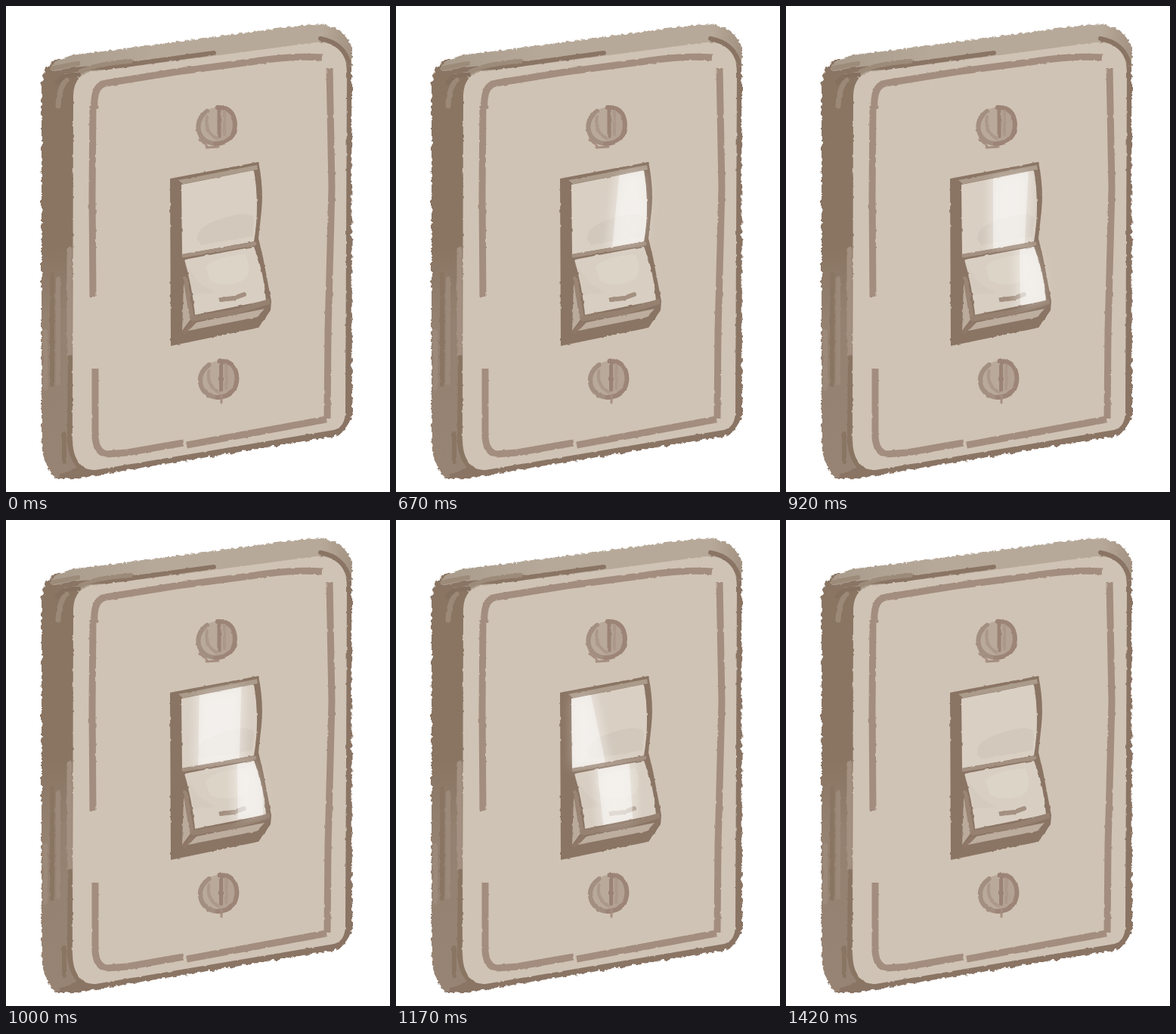
An HTML page for the animation above (2.58 s loop, 508 px wide and 642 px high).

```html
<!DOCTYPE html>
<html lang="en">
<head>
<meta charset="utf-8">
<title>Light switch</title>
<style>
html, body { margin: 0; width: 100%; height: 100%; overflow: hidden; background: #fff; }
svg { display: block; width: 100vw; height: 100vh; }
.line { fill: none; stroke-linecap: round; stroke-linejoin: round; }
</style>
</head>
<body>
<svg viewBox="0 0 508 642">
  <defs>
    <filter id="rough" filterUnits="userSpaceOnUse" x="0" y="0" width="508" height="642" color-interpolation-filters="sRGB">
      <feTurbulence type="fractalNoise" baseFrequency=".18" numOctaves="3" seed="4"/>
      <feDisplacementMap in="SourceGraphic" scale="6" xChannelSelector="R" yChannelSelector="G"/>
    </filter>
    <filter id="grain" filterUnits="userSpaceOnUse" x="0" y="0" width="508" height="642" color-interpolation-filters="sRGB">
      <feTurbulence type="fractalNoise" baseFrequency=".13" numOctaves="2" seed="9"/>
      <feDisplacementMap in="SourceGraphic" scale="2.5" xChannelSelector="R" yChannelSelector="G"/>
    </filter>
    <filter id="soft" filterUnits="userSpaceOnUse" x="180" y="180" width="210" height="260"><feGaussianBlur stdDeviation="6"/></filter>
    <filter id="halo" filterUnits="userSpaceOnUse" x="180" y="180" width="210" height="260"><feGaussianBlur stdDeviation="8"/></filter>
    <linearGradient id="side" x1="0" y1="0" x2="0" y2="1">
      <stop offset=".45" stop-color="#8a7563"/><stop offset=".62" stop-color="#958170"/><stop offset="1" stop-color="#988474"/>
    </linearGradient>
    <linearGradient id="topSide"><stop offset="0" stop-color="#a99b8b"/><stop offset=".35" stop-color="#b7a999"/><stop offset=".9" stop-color="#b7a999"/><stop offset="1" stop-color="#a39282"/></linearGradient>
    <path id="upper" d="M232 236L328 217Q336 264 328 311L233 328Z"/>
    <path id="lower" d="M236 335L328 318Q341 350 344 389L250 408Q246 368 236 335Z"/>
    <clipPath id="clip0"><use href="#upper"/></clipPath>
    <clipPath id="clip1"><use href="#lower"/></clipPath>
  </defs>

  <g filter="url(#rough)">
    <path fill="url(#side)" d="M47 108Q48 72 76 68L120 66V614L100 621Q85 627 66 623Q49 612 47 575Z"/>
    <path fill="#8a7464" d="M92 610L444 550L456 535Q457 559 436 568L95 624L64 624Z M440 60L457 66L458 540L446 552Z"/>
    <path fill="url(#topSide)" d="M58 84Q62 70 88 65L404 24Q452 25 457 56V82L430 60L100 95Z"/>
  </g>

  <g filter="url(#grain)">
    <path fill="#cfc3b5" d="M89 118Q90 88 118 86L275 66L410 48Q450 46 451 88L449 535Q449 556 434 560L118 613Q88 614 88 570Z"/>
    <g class="line">
      <path stroke="#8a7464" stroke-width="6" d="M62 90Q90 82 135 81L275 62 M416 43Q447 49 454 76"/>
      <path stroke="#9d8b7a" stroke-width="6" d="M62 82L95 76 M98 87Q120 76 165 73"/>
      <path stroke="#857060" stroke-width="6" d="M68 101Q76 89 96 91"/>
      <path stroke="#9c8877" stroke-width="7" d="M69 132Q70 108 80 98"/>
      <path stroke="#a39080" stroke-width="7" d="M84 322V460"/>
      <path stroke="#8a7563" stroke-width="6" d="M85 464L84 575Q86 600 100 611 M61 354V500 M77 565V602"/>
      <path stroke="#9c8979" stroke-width="6" d="M69 360V498 M52 430V505"/>
      <path stroke="#a38d7e" stroke-width="9" stroke-linecap="butt" d="M115 384L114 250L115 132 M117 136Q115 105 132 102L225 87L330 73Q380 65 418 68 M428 82L431 240L426 430L425 545 M118 479V570Q120 590 133 592L160 590L235 577 M239 580L375 555L424 546"/>
    </g>

    <g id="screw">
      <circle cx="279" cy="158" r="24" fill="#b9a99b"/>
      <path fill="#b3a194" d="M286 136Q305 145 302 162Q298 178 278 181Z"/>
      <g class="line">
        <path stroke="#a38f81" stroke-width="6" d="M266 139Q250 151 256 168Q262 182 280 182"/>
        <path stroke="#9c8476" stroke-width="6" d="M280 134Q302 133 303 157Q302 181 277 182"/>
        <path stroke="#9a8375" stroke-width="5" d="M282 136L282 172"/>
        <path stroke="#ab988a" stroke-width="4" d="M289 139L289 170 M266 147Q262 164 278 175"/>
      </g>
    </g>
    <use href="#screw" x="2.5" y="335"/>
    <path class="line" stroke="#a68f82" stroke-width="3" d="M256 176L266 185 M265 187L281 186 M285 515V524"/>

    <path fill="#8a7463" d="M217 228L334 206Q341 240 338 270L334 307L340 332L351 390L350 402L334 425L218 449Z"/>
    <path fill="#ab9b8b" d="M228 230L332 210L333 216L234 235Z"/>
    <path fill="#baaa9b" d="M235 365L247 410L233 429Z"/>
    <path fill="#bcad9e" d="M252 418L342 400L332 411L241 429Z"/>
    <use href="#upper" fill="#d9cfc3"/>
    <path fill="#d2c8bc" d="M253 309Q250 291 288 280Q320 270 328 280L326 311L265 322Z"/>
    <path fill="#d9cfc3" d="M257 316L327 304V311L255 324Z"/>
    <use href="#lower" fill="#d8cec2"/>
    <path fill="#ddd4c8" d="M264 345Q274 331 317 328Q326 350 316 361Q291 374 270 363Z"/>
    <path fill="#d2c7ba" d="M241 345L256 366L278 379L248 382Z" opacity=".5"/>
    <g class="line">
      <path stroke="#a39080" stroke-width="5" d="M235 330L329 314"/>
      <path stroke="#9a8575" stroke-width="6" d="M237 360L246 412"/>
      <path stroke="#968171" stroke-width="7" d="M248 413L303 404L346 391"/>
      <path stroke="#8f7868" stroke-width="5" d="M247 419L236 431"/>
      <path stroke="#a39080" stroke-width="6" d="M284 388L301 386L315 381"/>
    </g>
  </g>
  <g id="shine" fill="#fff"></g>
</svg>
<script>
const LOOP = 2580;
// The shine runs at 12 pictures a second, on a 10 ms grid
const TIMES = [0, ...Array.from({ length: 12 }, (_, i) => 500 + 10 * Math.round(i * 25 / 3))];

// Band edges per face: time, left top, left bottom, right top, right bottom
const FACES = [
  { top: 215, bottom: 330, keys: [
    [500, 339, 310, 362, 362], [750, 276, 273, 345, 345], [920, 274, 274, 321, 315],
    [1080, 238, 234, 302, 302], [1250, 212, 212, 212, 259], [1330, 200, 200, 200, 225]] },
  { top: 316, bottom: 410, keys: [
    [750, 344, 328, 362, 362], [920, 309, 310, 355, 355], [1080, 302, 304, 321, 327],
    [1250, 232, 249, 297, 303], [1330, 225, 235, 230, 264]] }
];
const NS = "http://www.w3.org/2000/svg";
const shine = document.getElementById("shine");

function add(parent, tag, attrs) {
  const el = document.createElementNS(NS, tag);
  for (const key in attrs) el.setAttribute(key, attrs[key]);
  return parent.appendChild(el);
}

FACES.forEach((face, i) => {
  const clip = `url(#clip${i})`;
  const haze = add(shine, "g", { filter: "url(#halo)", opacity: .3 });
  face.halo = add(add(haze, "g", { "clip-path": clip }), "path", {});
  const inside = add(shine, "g", { "clip-path": clip });
  face.soft = add(inside, "path", { filter: "url(#soft)", opacity: .22 });
  face.band = add(inside, "path", { opacity: .4 });
});

function edgesAt(keys, t) {
  if (t < keys[0][0] || t > keys[keys.length - 1][0]) return null;
  const n = Math.max(1, keys.findIndex(k => k[0] >= t));
  const a = keys[n - 1], b = keys[n];
  const p = (t - a[0]) / (b[0] - a[0]);
  return a.slice(1).map((v, i) => v + (b[i + 1] - v) * p);
}

function draw(ms) {
  const t = TIMES.filter(v => v <= ms % LOOP).pop();
  for (const face of FACES) {
    const e = edgesAt(face.keys, t);
    const shape = grow => e
      ? `M${e[0] - grow} ${face.top}H${e[2] + grow}L${e[3] + grow} ${face.bottom}H${e[1] - grow}Z` : "";
    face.band.setAttribute("d", shape(0));
    face.soft.setAttribute("d", shape(7));
    face.halo.setAttribute("d", shape(0));
  }
}

const start = performance.now();
function tick() {
  draw(performance.now() - start);
  requestAnimationFrame(tick);
}
draw(0);
tick();
</script>
</body>
</html>
```
